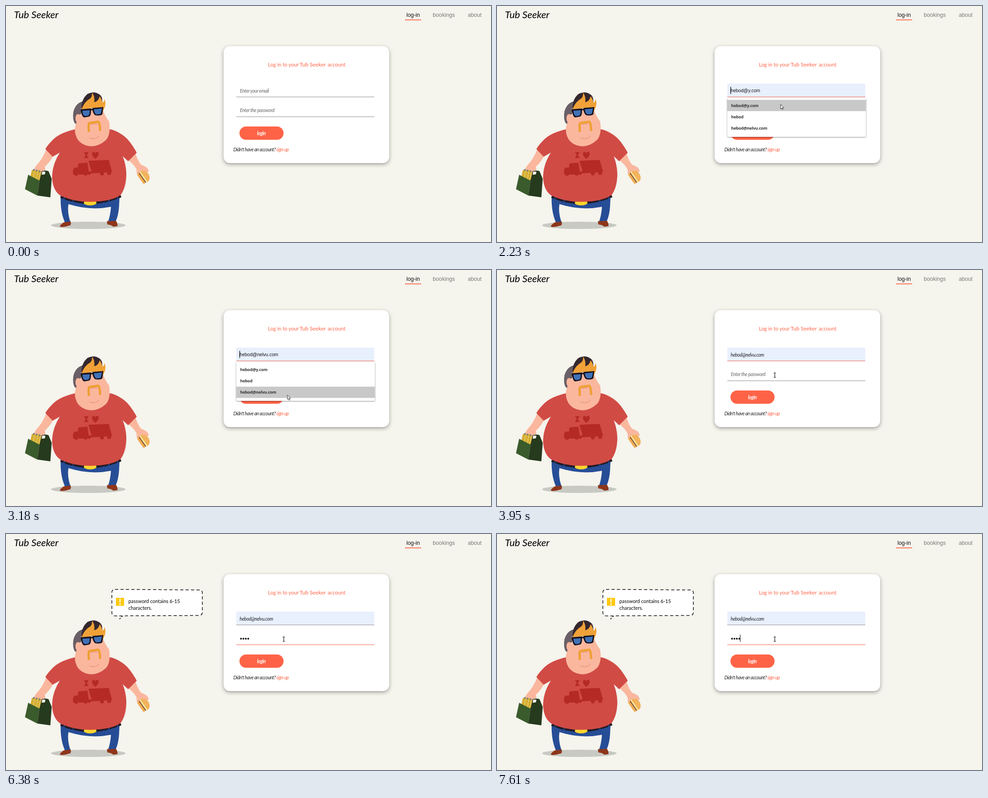
An HTML page for the animation above (8000 ms loop, 1072x523 px).

```html
<!DOCTYPE html>
<html lang="en">
<head>
<meta charset="utf-8">
<title>Log in</title>
<style>
html, body { margin: 0; width: 100%; height: 100%; overflow: hidden; background: #f5f4ed; }
svg { display: block; width: 1072px; height: 523px; }

.nav { font: 12.2px "Liberation Sans", Arial, sans-serif; fill: #7b7974; }
.nav .here { fill: #111; }
.logo { font: italic 22px Lato, sans-serif; }
.title { font: 11.3px Lato, sans-serif; }
.title .brand { font-size: 12px; }
.tip { font: 10.9px Lato, sans-serif; }
.form { font: italic 10.5px Lato, sans-serif; letter-spacing: -.4px; fill: #222; }
.form .hint { fill: #666; }
.form .foot { letter-spacing: -.5px; }
.form .link { fill: #ff6347; }
.form .label { fill: #fff; stroke: #fff; stroke-width: .3px; }
.typed { font: 10.2px "Liberation Sans", Arial, sans-serif; fill: #111; }
.option { font: 600 9px "Noto Sans", sans-serif; letter-spacing: -.2px; fill: #333; }
.coral { fill: #ff6347; }
.skin { fill: #fab79d; }
.print { fill: #b52a24; }
.card { fill: #fff; filter: drop-shadow(0 3px 4px rgba(0,0,0,.35)); }
.menu { fill: #fff; filter: drop-shadow(0 1px 1.5px rgba(0,0,0,.45)); }

/* All timelines share one 8 s clock: 1% = 80 ms */
[data-t] { animation: 8s step-end infinite; }
#hint1 { animation-name: hint1; }
#hint2 { animation-name: hint2; }
#line1 { animation-name: line1; }
#line2 { animation-name: line2; }
#fill { animation-name: fill; }
#menu { animation-name: menu; }
#hover { animation-name: hover; }
#view1 { animation-name: view1; }
#view2 { animation-name: view2; }
#view3 { animation-name: view3; }
#email { animation-name: email; }
#caret1 { animation-name: caret1; }
#caret2 { animation-name: caret2; }
#dots { animation-name: dots; }
#bubble { animation-name: bubble; }
#cursor { animation-name: cursor; }
#arrow { animation-name: arrow; }
#beam { animation-name: beam; }

@keyframes hint1 { 0% { opacity: 1 } 27.875%, 100% { opacity: 0 } }
@keyframes hint2 { 0% { opacity: 1 } 60.125%, 100% { opacity: 0 } }
@keyframes line1 { 0% { stroke: #8f8f8f } 17.25% { stroke: #f0644e } 54.375%, 100% { stroke: #8f8f8f } }
@keyframes line2 { 0% { stroke: #8f8f8f } 54.375%, 100% { stroke: #f0644e } }
@keyframes fill { 0% { opacity: 0 } 27.875%, 100% { opacity: 1 } }
@keyframes menu { 0% { opacity: 0 } 18.125% { opacity: 1 } 41.625%, 100% { opacity: 0 } }
@keyframes hover {
  0% { opacity: 0; transform: none }
  27.875% { opacity: 1; transform: none }
  29.8% { opacity: 1; transform: translateY(25px) }
  31.75%, 100% { opacity: 1; transform: translateY(50.5px) }
}
@keyframes view1 { 0% { opacity: 0 } 27.875% { opacity: 1 } 29.8%, 100% { opacity: 0 } }
@keyframes view2 { 0% { opacity: 0 } 29.8% { opacity: 1 } 31.75%, 100% { opacity: 0 } }
@keyframes view3 { 0% { opacity: 0 } 31.75% { opacity: 1 } 41.625%, 100% { opacity: 0 } }
@keyframes email { 0% { opacity: 0 } 41.625%, 100% { opacity: 1 } }
@keyframes caret1 {
  0% { opacity: 0; transform: none }
  17.25% { opacity: 1; transform: none }
  24.125% { opacity: 0; transform: none }
  27.875% { opacity: 1; transform: none }
  41.625% { opacity: 1; transform: translateX(76px) }
  48.4%, 100% { opacity: 0; transform: translateX(76px) }
}
@keyframes caret2 {
  0% { opacity: 0; transform: none }
  55.375% { opacity: 1; transform: none }
  60.125% { opacity: 1; transform: translateX(5px) }
  63% { opacity: 1; transform: translateX(10px) }
  67% { opacity: 1; transform: translateX(15px) }
  68.875% { opacity: 1; transform: translateX(21px) }
  75.75% { opacity: 0; transform: translateX(21px) }
  82.625% { opacity: 1; transform: translateX(21px) }
  89.375% { opacity: 0; transform: translateX(21px) }
  95.125%, 100% { opacity: 1; transform: translateX(21px) }
}
@keyframes dots {
  0% { stroke-dashoffset: 22px }
  60.125% { stroke-dashoffset: 16.5px }
  63% { stroke-dashoffset: 11px }
  67% { stroke-dashoffset: 5.5px }
  68.875%, 100% { stroke-dashoffset: 0px }
}
@keyframes bubble { 0% { opacity: 0 } 79.75%, 100% { opacity: 1 } }
@keyframes cursor {
  0% { transform: translate(869px, 442px) }
  1.75% { transform: translate(869px, 442px); animation-timing-function: steps(4) }
  5.5% { transform: translate(655px, 247px) }
  7.4% { transform: translate(655px, 247px); animation-timing-function: steps(6) }
  13.25% { transform: translate(627px, 191px) }
  27.875% { transform: translate(627px, 218px); animation-timing-function: steps(4) }
  31.75% { transform: translate(624px, 263px); animation-timing-function: steps(3) }
  34.75% { transform: translate(614px, 271px) }
  39.75% { transform: translate(622px, 277px) }
  44.525% { transform: translate(622px, 277px); animation-timing-function: steps(5) }
  49.375%, 100% { transform: translate(614px, 233px) }
}
@keyframes arrow {
  0% { opacity: 0 } 1.75% { opacity: 1 } 12.275% { opacity: 0 }
  27.875% { opacity: 1 } 48.4%, 100% { opacity: 0 }
}
@keyframes beam {
  0% { opacity: 0 } 12.275% { opacity: 1 } 27.875% { opacity: 0 } 48.4%, 100% { opacity: 1 }
}
</style>
</head>
<body>
<svg viewBox="0 0 1072 523" xmlns="http://www.w3.org/2000/svg">
  <defs>
    <mask id="reveal" maskUnits="userSpaceOnUse" x="510" y="220" width="40" height="24">
      <path id="dots" data-t d="M516.5 232H538.5" stroke="#fff" stroke-width="10" stroke-dasharray="22 30"/>
    </mask>
  </defs>

  <!-- Header -->
  <text class="logo" x="17.5" y="26.500">Tub Seeker</text>
  <g class="nav">
    <text class="here" x="885" y="23.5">log-in</text>
    <text x="943.3" y="23.5">bookings</text>
    <text x="1020.7" y="23.5">about</text>
  </g>
  <rect class="coral" x="882" y="29.8" width="35.5" height="1.8"/>

  <!-- Man -->
  <ellipse cx="182" cy="486" rx="82.5" ry="8" fill="#c8c9c3"/>
  <g fill="#8e361b">
    <path d="M119 488Q121 483 131 478L142 476Q145 482 142 486L131 489Q120 491 119 488Z"/>
    <path d="M223 477L242 474Q248 484 246 488L237 489Q233 485 224 484Z"/>
  </g>
  <path fill="#264d96" d="M121 418L251 422 250 442Q249 462 243 476L226 477Q231 462 232 445Q185 454 138 439Q135 456 142 478L130 479Q119 454 121 418Z"/>
  <path class="skin" d="M89 318Q80 340 68 352Q60 361 63 369L82 370Q88 362 86 356Q97 346 105 331Z"/>
  <path class="skin" d="M270 341L286 326Q292 345 299 352Q313 356 316 366L301 375Q287 377 289 367Q290 358 270 341Z"/>
  <path fill="none" stroke="#211a25" stroke-width="6" d="M121 422Q186 450 254 421"/>
  <path fill="none" stroke="#264d96" stroke-width="2" d="M129 423L128 431M149 430L148 437M227 429L228 436M246 422L247 428"/>
  <ellipse cx="186" cy="436" rx="14" ry="6" fill="#fdd32f"/>
  <path fill="#d14b45" d="M153 273Q119 281 104 296Q92 308 87 317L103 334 119 325Q101 353 102 383Q104 409 120 420Q149 434 187 434Q236 433 254 418Q266 401 266 371Q265 350 258 333L270 344 289 325Q275 300 263 290Q246 276 229 273Z"/>

  <path fill="#6a5f66" d="M174 211Q155 212 149 234Q146 257 155 262L160 244Q169 240 169 226Z"/>
  <path class="skin" d="M166 226L214 228Q217 242 228 256Q232 283 222 296Q206 311 189 311Q163 309 155 289Q149 273 156 258Q151 247 156 241Q161 237 166 244Z"/>
  <path fill="#33272f" d="M167 228Q166 207 180 195Q196 187 208 197Q215 204 212 216Z"/>
  <path fill="#f0a137" d="M167 229Q173 212 186 205Q191 201 190 192Q197 200 195 213Q204 212 207 200Q212 207 213 214Q218 212 217 206Q223 215 216 230Q213 236 213 230L190 226Z"/>
  <path fill="#14121d" d="M165 229L188 227 191 229 191 226 215 224 213 240Q208 244 197 242Q193 239 191 231L188 231Q188 243 184 245L173 247Q167 245 165 229Z"/>
  <path fill="#4171b7" d="M169 232L185 231Q185 241 182 243L174 244Q169 241 169 232ZM194 229L212 227 210 238Q206 241 199 240Q195 237 194 229Z"/>
  <path fill="none" stroke="#ef9f34" stroke-width="5" d="M183 279L182.500 263Q183 258 190 258.500L203 256.500Q208 257 208 277"/>
  <path fill="none" stroke="#e79580" stroke-width="1.5" d="M184 292Q197 297 206 289M187 263Q194 260 202 262"/>

  <g class="print">
    <path d="M173 324H182V327H179.500V334H182V337H173V334H175.500V327H173Z"/>
    <path d="M197.500 339Q189 331 190 326Q193 320 197.500 326Q202 320 205 326Q206 331 197.500 339Z"/>
    <path d="M148 373V363L151 358H159L160 349 180 347 183 367 233 363 234 368 187 371 186 374Z"/>
    <path d="M182 343L227 341 234 366 190 370Z"/>
    <circle cx="155" cy="372" r="4.500"/><circle cx="176" cy="371.500" r="4.500"/>
    <circle cx="212" cy="371" r="4.500"/><circle cx="228" cy="370" r="4.500"/>
  </g>
  <path stroke="#d14b45" stroke-width="1.500" d="M181.500 345L187 365"/>

  <path fill="#d3ad35" d="M53 382L57 364 63 361 77 364 79 376 75 389Z"/>
  <path fill="none" stroke="#edcf69" stroke-width="1.500" d="M60 383L63 366M67 386L70 367M73 386L76 369"/>
  <path fill="#3a5b2b" d="M49 374L74 387 69 420 42 406ZM73 388L80 372 83 388Z"/>
  <path fill="#263a1e" d="M74 387L79 366Q86 363 94 366L101 383 98 424 69 420Z"/>
  <path fill="#f5f4ed" d="M80 367H87L86 373 79 374Z"/>
  <path class="skin" d="M61 363Q65 354 76 354Q87 355 87 362L83 366 79 364 76 367 72 363 67 365Z"/>
  <path stroke="#68778c" stroke-width="3" d="M60 364L63 362M66 365L69 364M73 367L76 366"/>

  <g transform="translate(304 379) rotate(55)">
    <path fill="#f2b057" d="M-14 -1Q-12 -13 0 -13Q13 -12 14 -1Z"/>
    <path stroke="#f5e58c" stroke-width="3" d="M-14 0H14"/>
    <path stroke="#77402a" stroke-width="2" d="M-13 3H13"/>
    <rect x="-13" y="4" width="26" height="5" rx="2.500" fill="#f0ab50"/>
    <path stroke="#fbe0ad" d="M-6 -8h2M0 -10h2M5 -7h2M0 -5h2"/>
  </g>

  <!-- Speech bubble -->
  <g id="bubble" data-t>
    <path fill="#fff" stroke="#111" stroke-width="1.500" stroke-dasharray="7 5" d="M241 122.700L427 124Q434 124 434 131V173Q434 180.500 427 180.500L241 181.500Q234 181.500 234 174V130Q234 122.700 241 122.700Z"/>
    <path fill="none" stroke="#111" stroke-width="1.500" d="M258 182L255 184M253 186L251 189"/>
    <rect x="243" y="141.500" width="18" height="17.500" fill="#ffc90e"/>
    <path fill="#fff" d="M250.500 144H253.500L253 152H251ZM250.500 154H253.500V157H250.500Z"/>
    <g class="tip">
      <text x="270.500" y="153">password contains 6-15</text>
      <text x="270.500" y="168">characters.</text>
    </g>
  </g>

  <!-- Login card -->
  <rect class="card" x="481" y="89" width="366" height="259" rx="14"/>
  <g class="title coral">
    <text x="579" y="133.500">Log in to your</text>
    <text class="brand" x="649" y="133.500">Tub Seeker</text>
    <text x="711" y="133.500">account</text>
  </g>

  <rect id="fill" data-t x="509" y="172" width="305" height="30" fill="#e8f0fe"/>
  <path id="line1" data-t d="M509 201.500H814"/>
  <path id="line2" data-t d="M509 245.500H814"/>

  <g class="form">
    <text id="hint1" data-t class="hint" x="517" y="191.500">Enter your email</text>
    <text id="hint2" data-t class="hint" x="517" y="235">Enter the password</text>
    <text id="email" data-t x="516.500" y="191.500">hebod@nelvu.com</text>
  </g>
  <g class="typed">
    <text id="view1" data-t x="516.500" y="191">hebod@y.com</text>
    <text id="view2" data-t x="516.500" y="191">hebod</text>
    <text id="view3" data-t x="516.500" y="191">hebod@nelvu.com</text>
  </g>
  <g mask="url(#reveal)" fill="#111">
    <circle cx="519.500" cy="232" r="2"/><circle cx="524.800" cy="232" r="2"/>
    <circle cx="530.100" cy="232" r="2"/><circle cx="535.400" cy="232" r="2"/>
  </g>
  <rect id="caret1" data-t x="516" y="179" width="1.200" height="16"/>
  <rect id="caret2" data-t x="516" y="223" width="1" height="16"/>

  <rect class="coral" x="516" y="267" width="97.500" height="29.500" rx="14.750"/>
  <g class="form">
    <text class="label" x="555" y="286">login</text>
    <text class="foot" x="502.500" y="322">Didn't have an account?</text>
    <text class="foot link" x="597.500" y="322">sign up</text>
  </g>

  <!-- Autofill menu -->
  <g id="menu" data-t>
    <path class="menu" d="M509 204H815.500V288Q815.500 290 813.500 290H511Q509 290 509 288Z"/>
    <rect id="hover" data-t x="509" y="208" width="306.500" height="25" fill="#c8c8c8"/>
    <g class="option">
      <text x="517.500" y="223.500">hebod@y.com</text>
      <text x="517.500" y="249">hebod</text>
      <text x="517.500" y="274">hebod@nelvu.com</text>
    </g>
  </g>

  <!-- Pointer -->
  <g id="cursor" data-t>
    <path id="arrow" data-t fill="#fff" stroke="#222" stroke-width=".9" d="M0 0V10L2.300 8 3.800 11.500 5.300 10.900 3.900 7.400H7Z"/>
    <path id="beam" data-t fill="none" stroke="#111" stroke-width="1.200" d="M-2.500 -5H2.500M0 -5V5M-2.500 5H2.500"/>
  </g>
</svg>
</body>
</html>
```
